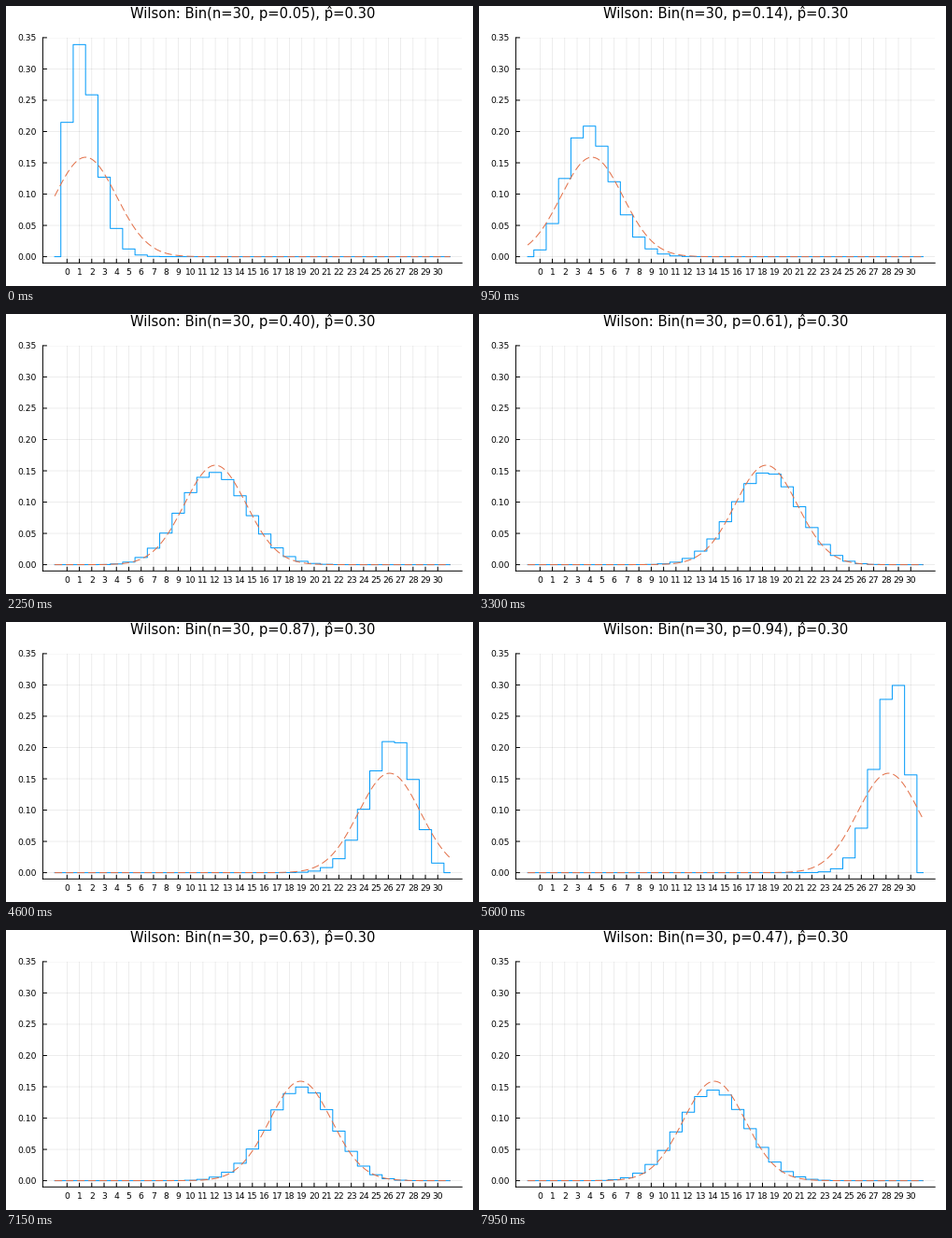
A matplotlib script for the animation above (8 s loop, 500 by 300 pixels).

```python
import math

import matplotlib.pyplot as plt
import numpy as np
from matplotlib.animation import FuncAnimation

W, H, DPI = 500, 300, 100
PX = 72 / DPI  # points per pixel
N, P_HAT = 30, 0.30
STEP_MS, FRAMES = 50, 160
RISE, TOP, FALL = 10, 95, 111  # ramp start frame, peak percent, last held frame

LEFT, RIGHT, UPPER, LOWER = 39.4, 488.2, 33.9, 275.3
TICK = 4.5

plt.rcParams["font.family"] = "DejaVu Sans"
fig = plt.figure(figsize=(W / DPI, H / DPI), dpi=DPI, facecolor="white")
ax = fig.add_axes([LEFT / W, 1 - LOWER / H, (RIGHT - LEFT) / W, (LOWER - UPPER) / H])
ax.set_xlim(-1.96, 31.96)
ax.set_ylim(-0.01, 0.35)
xticks, yticks = np.arange(N + 1), np.arange(8) * 0.05
ax.set_xticks(xticks)
ax.set_yticks(yticks)
ax.yaxis.set_major_formatter("{x:.2f}")
ax.tick_params(length=0, labelsize=9.2 * PX)
ax.tick_params(axis="x", pad=5.5 * PX)
ax.tick_params(axis="y", pad=6.5 * PX)
ax.spines[["top", "right"]].set_visible(False)
ax.set_axisbelow(True)
ax.grid(color="black", alpha=0.1, linewidth=0.7 * PX)

# Inward tick marks, placed without rounding to whole pixels
marks = dict(color="black", linewidth=PX, clip_on=False, snap=False)
ax.vlines(xticks, 0, TICK / (LOWER - UPPER),
          transform=ax.get_xaxis_transform(), **marks)
ax.hlines(yticks, 0, TICK / (RIGHT - LEFT),
          transform=ax.get_yaxis_transform(), **marks)
for side in ("left", "bottom"):
    ax.spines[side].set(linewidth=PX, snap=False)
for line in [*ax.get_xgridlines(), *ax.get_ygridlines()]:
    line.set_snap(False)

title = fig.text((LEFT + RIGHT) / 2 / W, 1 - 13 / H, "", fontsize=14.75 * PX,
                 ha="center", va="baseline")

ks = np.arange(-1, N + 2)
xs = np.linspace(-1, N + 1, 400)
sigma = math.sqrt(N * P_HAT * (1 - P_HAT))
steps, = ax.plot([], [], color="#009afa", lw=PX, drawstyle="steps-mid", snap=False)
bell, = ax.plot([], [], color="#e36f47", lw=PX, dashes=(8, 4),
                dash_capstyle="butt", snap=False)


def success_rate(frame):
    if frame <= FALL:
        percent = min(TOP, 5 + max(0, frame - RISE))
    else:
        percent = TOP - (frame - FALL)
    return percent / 100


def binomial(k, p):
    if not 0 <= k <= N:
        return 0.0
    return math.comb(N, k) * p**k * (1 - p) ** (N - k)


def draw(frame):
    p = success_rate(frame)
    steps.set_data(ks, [binomial(int(k), p) for k in ks])
    z = (xs - N * p) / sigma
    bell.set_data(xs, np.exp(-z * z / 2) / (sigma * math.sqrt(2 * math.pi)))
    title.set_text(f"Wilson: Bin(n={N}, p={p:.2f}), p\u0302={P_HAT:.2f}")
    return steps, bell, title


anim = FuncAnimation(fig, draw, frames=FRAMES, interval=STEP_MS, repeat=True,
                     repeat_delay=0, init_func=lambda: draw(0))
plt.show()
```
